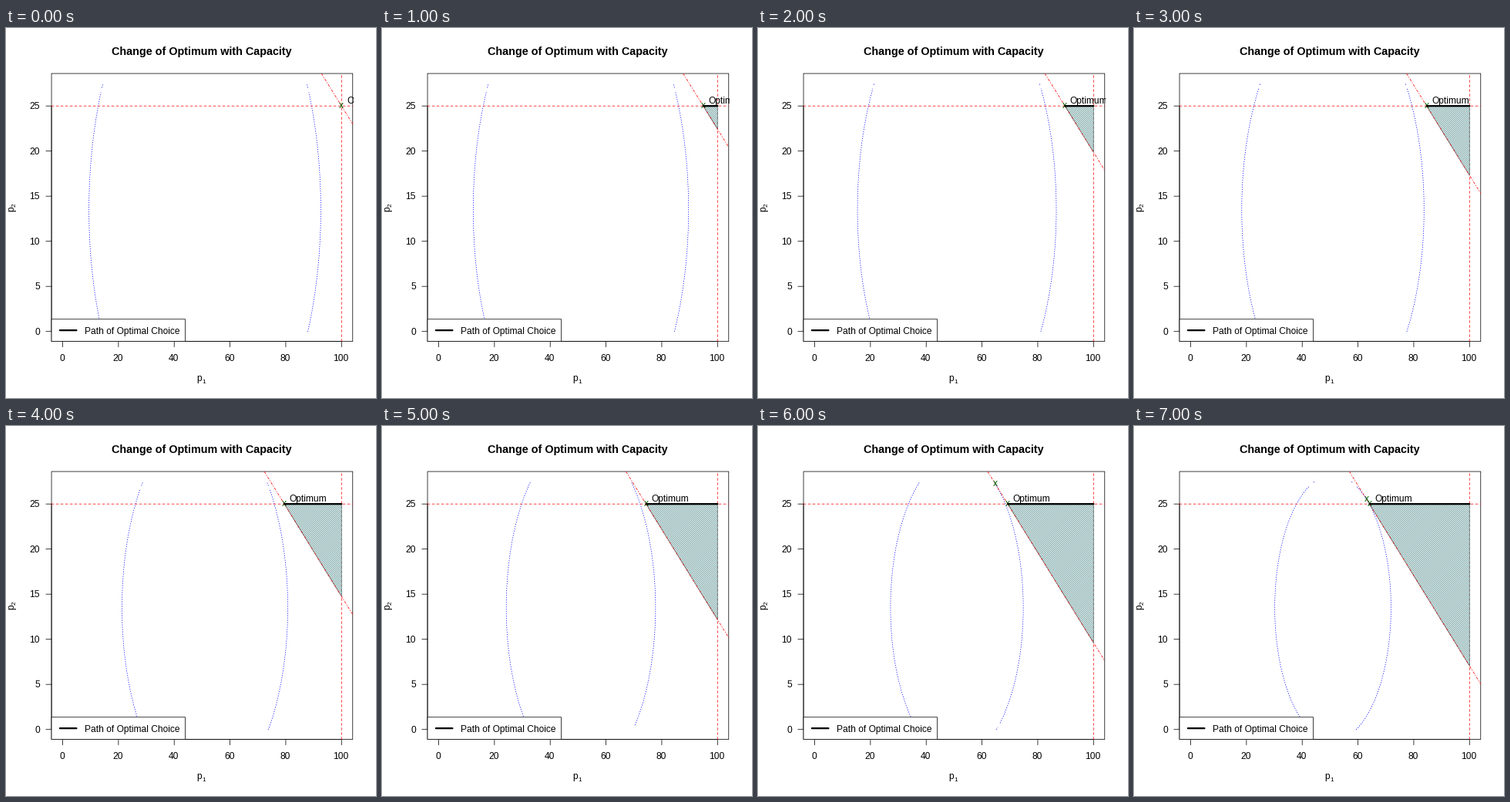
Write a matplotlib script that moves like this. It is 480 px wide and 480 px high and loops after 8 s.

```python
import math

import matplotlib.pyplot as plt
import numpy as np
from matplotlib.animation import FuncAnimation
from matplotlib.patches import Rectangle

plt.rcParams.update({"path.snap": False, "font.family": "Liberation Sans"})

SIZE = 480
PT = 0.75                       # points per pixel at 96 dpi
THIN = 0.75                     # basic line width in pixels
LEFT, RIGHT, TOP, BOTTOM = 59.04, 449.76, 59.04, 406.56
XMIN, XMAX, YMIN, YMAX = -4, 104, -1.1, 28.6
P1_MAX, P2_MAX = 100, 25
CENTER = 51, 13.5
STEPS = 8
HATCH_GAP = 1.8 * math.sqrt(2)
TEAL, GREEN = "#528b8b", "#006400"
DASHED, DOTTED, DOTDASH = (4, 4), (1, 3), (1, 3, 4, 3)

# Vertical pixel span left open in the contour at each step
BREAKS = [(77.5, 83.5), (77.5, 83.5), (74, 78.5), (74, 78.5),
          (77.3, 83), (388, 395), (385.5, 391), (73, 77.5)]


def px(x):
    return LEFT + (x - XMIN) * (RIGHT - LEFT) / (XMAX - XMIN)


def py(y):
    return BOTTOM - (y - YMIN) * (BOTTOM - TOP) / (YMAX - YMIN)


fig = plt.figure(figsize=(5, 5), dpi=96, facecolor="white")
ax = fig.add_axes([0, 0, 1, 1])
ax.set_xlim(0, SIZE)
ax.set_ylim(SIZE, 0)
ax.axis("off")


def line(xs=(), ys=(), color="black", width=THIN, z=2, dash=None):
    art, = ax.plot(xs, ys, color=color, lw=width * PT, zorder=z,
                   solid_capstyle="round", dash_capstyle="round")
    if dash:
        art.set_linestyle((0, dash))
    return art


def label(x, y, text, size=12, z=5, **kw):
    kw = {"ha": "left", "va": "baseline", **kw}
    return ax.text(x, y, text, fontsize=size * PT, zorder=z, **kw)


def box(x0, y0, x1, y1, z, fill):
    ax.add_patch(Rectangle((x0, y0), x1 - x0, y1 - y0, lw=THIN * PT, zorder=z,
                           ec="black", fc=fill))


def clip_to_plot(art):
    art.set_clip_on(True)
    art.set_clip_path(Rectangle((LEFT, TOP), RIGHT - LEFT + 1,
                                BOTTOM - TOP + 1, transform=ax.transData))


def draw_axes():
    box(LEFT, TOP, RIGHT, BOTTOM, 3, "none")
    line([px(0), px(P1_MAX)], [BOTTOM, BOTTOM])
    line([LEFT, LEFT], [py(0), py(P2_MAX)])
    for v in range(0, 101, 20):
        line([px(v)] * 2, [BOTTOM, BOTTOM + 7.2])
        label(px(v) - 0.6, 432, str(v), ha="center")
    for v in range(0, 26, 5):
        line([LEFT - 7.2, LEFT], [py(v)] * 2)
        label(44, py(v) + 4.3, str(v), ha="right")
    label(253.6, 35, "Change of Optimum with Capacity", 14.4,
          ha="center", weight="bold")
    label(247.6, 458, "p")
    label(254.2, 461, "1", 8.4)
    turned = {"rotation": 90, "rotation_mode": "anchor"}
    label(10, 238.5, "p", **turned)
    label(12.4, 231.8, "2", 8.4, **turned)


def draw_legend():
    box(LEFT, BOTTOM - 28.8, 232.5, BOTTOM, 4, "white")
    line([69.84, 91.44], [BOTTOM - 14.4] * 2, width=3 * THIN, z=5)
    label(102, 397, "Path of Optimal Choice")


def draw_limits():
    line([LEFT, RIGHT], [py(P2_MAX)] * 2, "red", z=6, dash=DASHED)
    line([px(P1_MAX)] * 2, [BOTTOM, TOP], "red", z=6, dash=DASHED)


draw_axes()
draw_legend()
draw_limits()

contour = line(color="blue", z=2, dash=DOTTED)
hatch = line(color=TEAL, z=7)
border = line(color=TEAL, z=7)
capacity = line(color="red", z=8, dash=DOTDASH)
marks = [label(0, 0, "x", z=9, color=GREEN, ha="center") for _ in range(2)]
path = line(width=3 * THIN, z=10)
caption = label(0, 98, "Optimum", z=11)
for art in (capacity, caption, *marks):
    clip_to_plot(art)


def set_contour(radius, span):
    """Ellipse (x - cx)^2 + 2 (y - cy)^2 = radius^2 cut to 0 <= y <= 27.5."""
    y = np.linspace(0, 27.5, 600)
    half = np.sqrt(np.maximum(radius ** 2 - 2 * (y - CENTER[1]) ** 2, 0))
    rows = py(y)
    rows[(rows > span[0]) & (rows < span[1])] = np.nan
    xs = [px(CENTER[0] - half), [np.nan], px(CENTER[0] + half)]
    contour.set_data(np.concatenate(xs), np.concatenate([rows, [np.nan], rows]))


def set_region(x0, y1):
    """Hatch the triangle between the limits and the capacity line."""
    right, top = px(P1_MAX), py(P2_MAX)
    if right - x0 < 1:
        hatch.set_data([], [])
        border.set_data([], [])
        return
    slope = (y1 - top) / (right - x0)
    first = math.ceil((x0 + top) / HATCH_GAP)
    last = math.floor((right + y1) / HATCH_GAP)
    c = np.arange(first, last + 1) * HATCH_GAP
    lo = (c - top + slope * x0) / (1 + slope)
    hi = np.minimum(right, c - top)
    gap = np.full_like(c, np.nan)
    hatch.set_data(np.column_stack([lo, hi, gap]).ravel(),
                   np.column_stack([c - lo, c - hi, gap]).ravel())
    border.set_data([x0, right, right, x0], [top, top, y1, top])


def update(step):
    total = 150 - step * 200 / 39            # p1 + 2 p2 on the capacity line
    best = total - 2 * P2_MAX
    shift = (total - CENTER[0] - 2 * CENTER[1]) / 3
    tangent = CENTER[0] + shift, CENTER[1] + shift

    set_contour(math.sqrt(3) * shift, BREAKS[step])
    set_region(px(best), py((total - P1_MAX) / 2))
    y_start = 33.6                           # just above the figure's top edge
    capacity.set_data([px(total - 2 * y_start), px(XMAX)],
                      [py(y_start), py((total - XMAX) / 2)])
    for mark, (x, y) in zip(marks, [(best, P2_MAX), tangent]):
        mark.set_position((px(x), py(y) + 3.2))
        mark.set_visible(y < YMAX)
    path.set_data([px(best), px(P1_MAX)], [py(P2_MAX)] * 2)
    caption.set_x(px(best) + 6.6)
    return contour, hatch, border, capacity, *marks, path, caption


anim = FuncAnimation(fig, update, frames=STEPS, interval=1000,
                     repeat=True, repeat_delay=0, blit=False)
plt.show()
```
